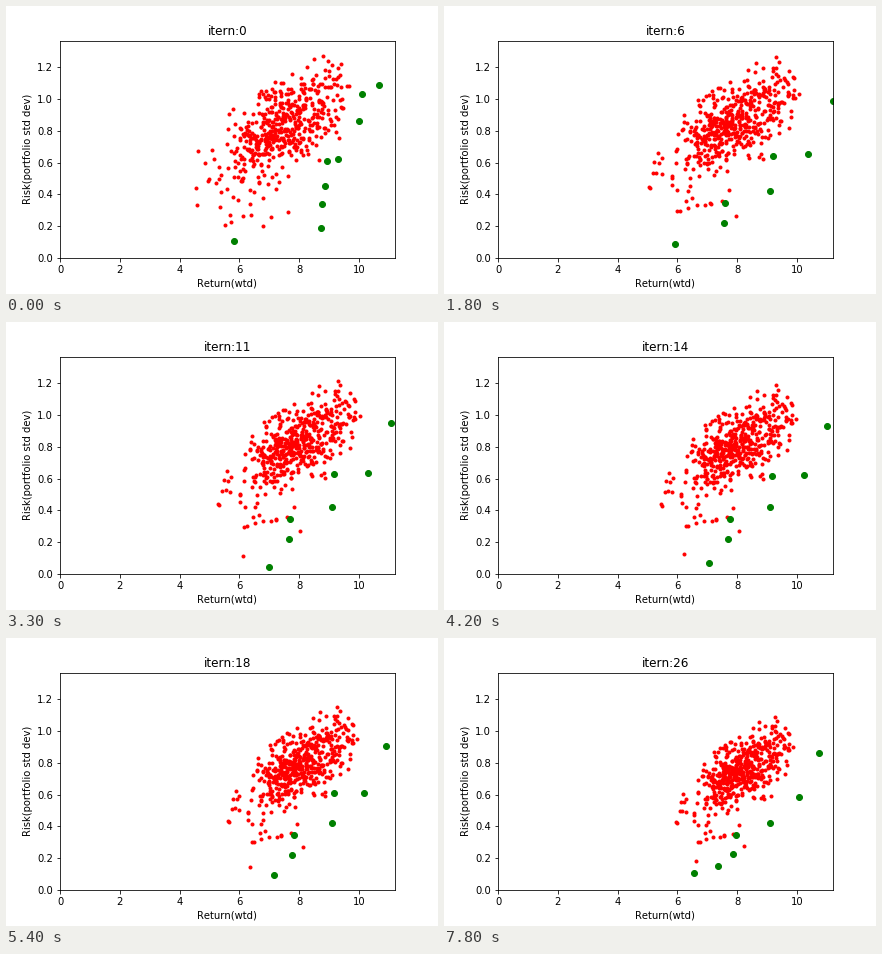
Animation, 432 px wide and 288 px high, one loop 8000 ms. Source, as a matplotlib script:

```python
import numpy as np
import matplotlib.pyplot as plt
from matplotlib.animation import FuncAnimation

STEP_MS, TICK_MS, LOOP_MS = 300, 100, 8000
SETTLE, LAST = 6, 26                 # a new leader takes over at SETTLE
LEADER = np.array([9.1, 0.34])
RATE = np.array([0.9873, 0.9895])    # share of the distance left after a step

# Efficient portfolios: first and last step on the front, then key positions
# (at the first step, at SETTLE if that is later, and at the end)
FRONT = [
    (0, 26, [(10.68, 1.09), (11.2, 0.985), (10.75, 0.86)]),
    (0, 26, [(10.0, 0.86), (10.38, 0.652), (10.07, 0.583)]),
    (0, 19, [(9.3, 0.62), (9.2, 0.64), (9.13, 0.59)]),
    (0, 26, [(8.87, 0.45), (9.1, 0.42), (9.1, 0.42)]),
    (0, 26, [(8.77, 0.34), (7.6, 0.343), (7.96, 0.343)]),
    (0, 26, [(8.73, 0.188), (7.57, 0.218), (7.87, 0.225)]),
    (0, 7, [(5.82, 0.105), (5.93, 0.088), (6.62, 0.18)]),
    (0, 2, [(10.1, 1.03), (10.08, 1.03), (9.86, 0.9)]),
    (0, 2, [(8.93, 0.61), (8.85, 0.62), (8.9, 0.57)]),
    (8, 26, [(6.9, 0.02), (7.36, 0.15)]),
    (19, 26, [(6.4, 0.05), (6.55, 0.11)]),
]

rng = np.random.default_rng(7)


def make_core(count):
    """Two overlapping lobes along a rising risk/return line."""
    lobe = rng.random(2 * count) < 0.38
    ret = np.where(lobe, rng.normal(7.1, 0.5, lobe.size),
                   rng.normal(8.35, 0.72, lobe.size))
    spread = rng.normal(0, 0.125, lobe.size)
    risk = 0.85 + 0.09 * (ret - 7.9) + spread
    keep = (ret > 6) & (ret < 10.2) & (abs(spread) < 0.31)
    return np.column_stack([ret, risk])[keep][:count]


def make_tail(count, ret_range, risk_range):
    low, high = zip(ret_range, risk_range)
    return rng.uniform(low, high, (count, 2))


settled = np.vstack([
    make_core(460),
    make_tail(22, (4.75, 6.5), (0.37, 0.7)),
    make_tail(11, (5.9, 8.0), (0.25, 0.48)),
    make_tail(8, (9.2, 10.2), (1.0, 1.3)),
])
initial = settled - (0.42, 0.02) + rng.normal(0, (0.15, 0.06), settled.shape)


def swarm(step):
    if step < SETTLE:
        return initial + (settled - initial) * step / SETTLE
    return LEADER + (settled - LEADER) * RATE ** (step - SETTLE)


def eased(step):
    """Step count warped so that later steps cover less ground."""
    return step if step < SETTLE else SETTLE + 1 - RATE[0] ** (step - SETTLE)


def front(step):
    """Positions still efficient, and those already dominated."""
    efficient, dominated = [], []
    for first, last, keys in FRONT:
        if step < first:
            continue
        steps = [first, SETTLE, LAST] if first < SETTLE else [first, LAST]
        times = [eased(s) for s in steps]
        point = [np.interp(eased(step), times, axis) for axis in zip(*keys)]
        (efficient if step <= last else dominated).append(point)
    return np.array(efficient), np.array(dominated).reshape(-1, 2)


plt.rcParams.update({"font.family": "DejaVu Sans", "text.kerning_factor": 6})
fig, ax = plt.subplots(figsize=(6, 4), dpi=72)
fig.subplots_adjust(left=0.125, right=0.9, bottom=0.125, top=0.88)
ax.set(xlim=(0, 11.2), ylim=(0, 1.367),
       xlabel="Return(wtd)", ylabel="Risk(portfolio std dev)")
title = ax.set_title("itern:0")
red_dots, = ax.plot([], [], "r.")
green_dots, = ax.plot([], [], "go")


def update(frame):
    step = frame * TICK_MS // STEP_MS
    efficient, dominated = front(step)
    red_dots.set_data(*np.vstack([swarm(step), dominated]).T)
    green_dots.set_data(*efficient.T)
    title.set_text(f"itern:{step}")
    return red_dots, green_dots, title


anim = FuncAnimation(fig, update, frames=LOOP_MS // TICK_MS,
                     interval=TICK_MS, repeat=True, repeat_delay=0)
plt.show()
```
